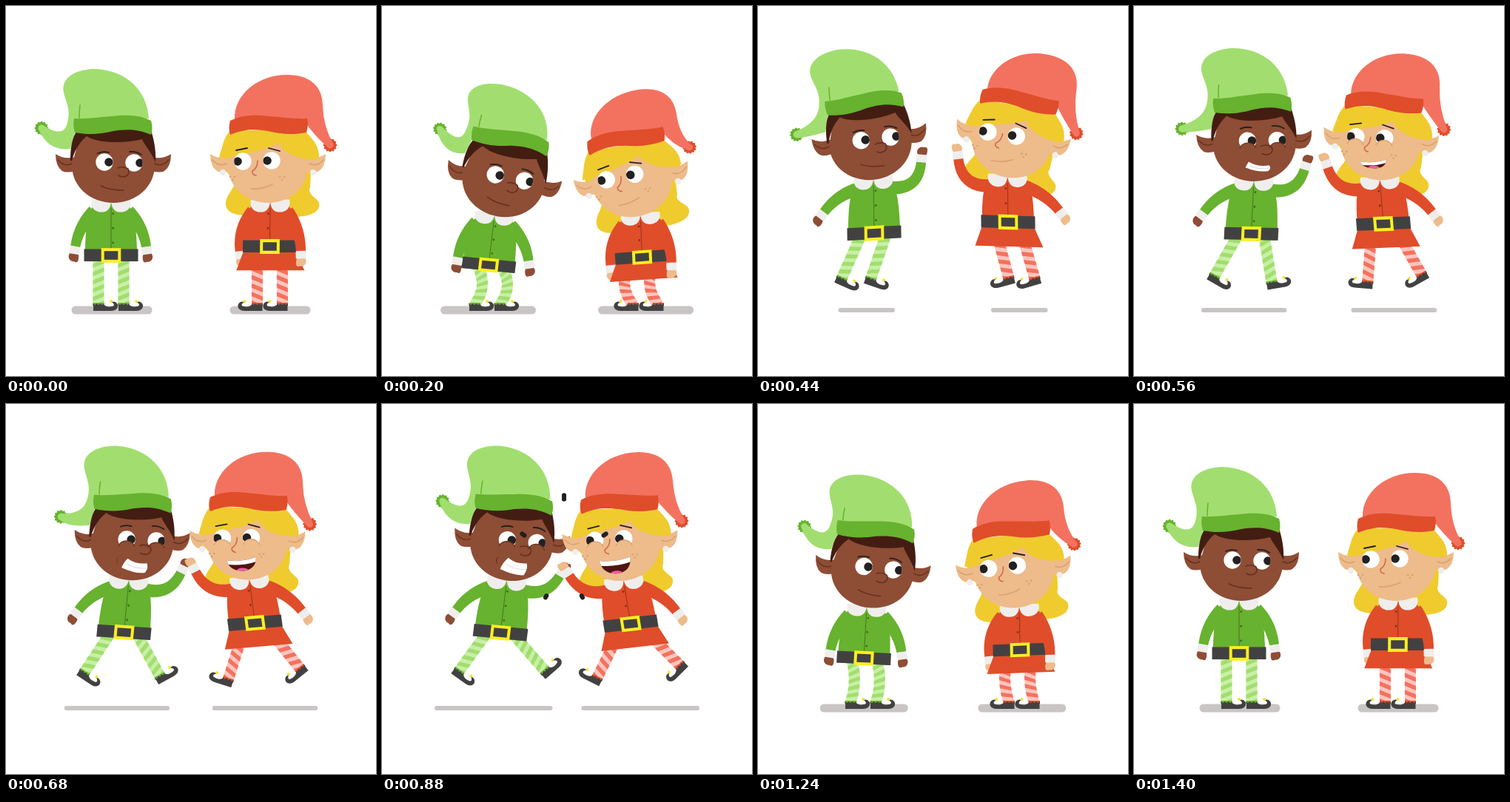
Write an HTML page that moves like this. It is 500x500 px and loops after 1480 ms.

```html
<!DOCTYPE html>
<html lang="en">
<head>
<meta charset="utf-8">
<title>Elf high five</title>
<style>
html, body { margin: 0; width: 100%; height: 100%; overflow: hidden; background: #fff; }
svg { display: block; width: 100vw; height: 100vh; }
</style>
</head>
<body>
<svg id="stage" viewBox="0 0 500 500">
  <defs><clipPath id="eye"><circle r="11.7"/></clipPath></defs>
  <g id="scene"></g>
</svg>
<script>
const LOOP = 1480, STEP = 40, FLOOR = 404;
const DARK = '#424142', WHITE = '#efeeed', INK = '#222021', YELLOW = '#f0cb2e';

// Both elves face right; the girl is mirrored on stage.
// head and belt: rest place, then x, y, angle offsets for crouch, leap and clap.
const boy = {
  main: '#67b22e', light: '#a1de6f', pale: '#c9efa5', skin: '#8e4d35', line: '#66301f',
  hair: '#431d12', cheek: 56, torso: 69, hip: 0, hem: '', buttons: 3, arm: 54, hang: 27, lag: 0, turn: 6,
  head: [[145, 217, 0], [19, 19, 10.5], [7, -31, -8], [30, -27, 4]],
  belt: [[142, 337, 0], [2, 13, 5.5], [15, -30, -3], [18, -28, 5.5]],
  backLeg: [-24, -36], frontLeg: [-19, 41],
  eyes: [[-12, -6, 6], [28, -5, 8]],
  brows: 'M-21-18Q-14-21-6-19M22-20Q31-21 38-16', browLift: 5,
  nose: 'M6 2Q13-1 20 3Q23 10 17 13Q11 15 7 12', noseColor: '#66301f',
  fringe: 'M-58-8C-58-27-55-45-45-52L50-52C55-37 58-22 57-6C50-22 42-29 39-37C15-31-20-31-36-41C-48-31-53-19-56-8Z',
  dome: 'M48-65C46-102 18-131-26-132C-53-131-71-119-67-100C-64-87-57-77-62-59',
  tip: [-97, -52], droop: 26, tail: [-77, -29], tailBend: [10, -9], root: '-58-24L-52-45',
  crease: 'M-46-66Q-46-75-45-83', mouth: grin
};
const girl = {
  main: '#e04d2a', light: '#f3725f', pale: '#fbc5bd', skin: '#eebb8b', line: '#d79f6d',
  hair: YELLOW, cheek: 54, torso: 57, hip: 10, hem: 'L45 32L-47 32', buttons: 2, arm: 57, hang: 18, lag: 100, turn: 0,
  head: [[146, 217, 0], [16, 19, 9.5], [11, -34, -10], [32, -27, 2]],
  belt: [[143.5, 325, 0], [5, 14.5, 4], [18.5, -33, -1.5], [20.5, -28, 6.5]],
  backLeg: [-16, -45], frontLeg: [-15, 26],
  eyes: [[34, -7, 7], [-5, -8, 6]],
  brows: 'M43-22L28-25M-1-25L-16-21', browLift: 1,
  nose: 'M14-8Q14 2 21 6Q22 11 16 12', noseColor: '#cd6a50',
  fringe: 'M66-12C62-32 54-42 44-49L-46-49C-61-39-70-27-69-11C-46-7-21-17-14-32C-2-24 26-19 57-11Z',
  backHair: 'M52-48C66-30 66-5 55 8L45 20C44 30 58 38 57 52C55 64 40 66 28 66L-25 67C-50 70-72 64-69 49C-68 43-52 38-57 28L-58 8C-70 0-74-25-50-48Z',
  dome: 'M45-65C46-95 16-124-26-124C-56-124-74-109-74-82',
  tip: [-84, -29], droop: 3, tail: [-69, -48], tailBend: [-6, -6], root: '-50-60',
  crease: '', mouth: laugh
};

const EAR = 'M-78-17Q-66-9-52-13L-52 6Q-63 9-69 6Q-78 0-78-17Z';
const EAR_LINE = 'M-75-9Q-66 1-56-4';
const COLLAR = 'M-26-6C-29 7-19 11-13 11C-5 11 0 6 0-6Z';
const SHOE = 'M-7 0L-7 8L17 8C25 8 28 2 25-2C23-5 20-5 17-4C22-2 22 2 18 2C13 3 10 2 8 0Z';
const BAND = 'M-53-65C-35-64-20-67-2-68C20-71 38-69 51-62Q54-52 51-43C30-52 15-50 0-48C-20-43-35-43-52-46Q-55-56-53-65Z';

const n = v => Math.round(v * 100) / 100;
const mix = (a, b, k) => a + (b - a) * k;
const rad = deg => deg * Math.PI / 180;
const path = (d, fill, more = '') => `<path d="${d}" fill="${fill}" ${more}/>`;
const stroke = (d, color, w, more = '') =>
  `<path d="${d}" fill="none" stroke="${color}" stroke-width="${w}" stroke-linecap="round" ${more}/>`;
const dot = (x, y, r, fill) => `<circle cx="${n(x)}" cy="${n(y)}" r="${r}" fill="${fill}"/>`;
const rect = (x, y, w, h, fill, more = '') =>
  `<rect x="${n(x)}" y="${n(y)}" width="${n(w)}" height="${n(h)}" fill="${fill}" ${more}/>`;
const group = (tf, body) => `<g transform="${tf}">${body}</g>`;
const both = body => body + group('scale(-1 1)', body);

function ramp(t, from, to) {
  const u = Math.min(1, Math.max(0, (t - from) / (to - from)));
  return u * u * (3 - 2 * u);
}
// How much of each action is in the pose at time t
function actions(t, lag) {
  const u = Math.min(1, Math.max(0, (t - 440) / 440));
  const up = ramp(t, 200, 440);
  return {
    crouch: ramp(t, 0, 200) - up + ramp(t, 880, 1080) - ramp(t, 1080, 1400),
    air: up - ramp(t, 880, 1080),
    arms: up - ramp(t, 880, 1080 + lag),
    droop: up - ramp(t, 560, 880),
    reach: 1 - (1 - u) ** 2
  };
}
const pose = (w, rest, crouch, leap, clap) => rest + w.crouch * crouch + w.air * mix(leap, clap, w.reach);
const joint = (w, [rest, ...moves]) => rest.map((v, i) => pose(w, v, ...moves.map(m => m[i])));

// Limb outline: edge(t, side) walks along either side of a bent tube
function tube(a, b, c, w0, w1) {
  return (t, side) => {
    const q = k => (1 - t) ** 2 * a[k] + 2 * t * (1 - t) * b[k] + t * t * c[k];
    const d = k => (1 - t) * (b[k] - a[k]) + t * (c[k] - b[k]);
    const len = Math.hypot(d(0), d(1)) || 1, w = side * mix(w0, w1, t) / 2;
    return n(q(0) - d(1) / len * w) + ' ' + n(q(1) + d(0) / len * w);
  };
}
function ribbon(edge) {
  const one = [], two = [];
  for (let i = 0; i <= 12; i++) {
    one.push(edge(i / 12, 1));
    two.unshift(edge(i / 12, -1));
  }
  return 'M' + one.concat(two).join('L') + 'Z';
}

// Angle is measured from hanging straight down, outwards from the body
function arm(c, [x, y], side, angle, bend) {
  const sin = Math.sin(rad(angle)), cos = Math.cos(rad(angle));
  const wx = x + side * sin * c.arm, wy = y + cos * c.arm;
  const ex = (x + wx) / 2 + side * cos * bend, ey = (y + wy) / 2 - sin * bend;
  const turn = Math.atan2(wy - ey, wx - ex) * 180 / Math.PI;
  return path(ribbon(tube([x, y], [ex, ey], [wx, wy], 18, 13)), c.main)
    + group(`translate(${n(wx)} ${n(wy)}) rotate(${n(turn)})`,
      dot(13.5, 0, 6.8, c.skin)
      + `<ellipse cx="16" cy="${4 * side}" rx="4.5" ry="3" fill="${c.skin}"/>`
      + rect(-.5, -7, 10.5, 14, WHITE, 'rx="1.5"'));
}

// The foot stays planted on the floor until the leg swings freely in the air
function leg(c, w, hip, side, swing) {
  const angle = mix(...swing, w.reach), [restX, restY] = c.belt[0];
  const len = FLOOR - restY - c.hip;
  const x = mix(restX + side * 17, hip[0] + Math.sin(rad(angle)) * len, w.air);
  const y = mix(FLOOR, hip[1] + Math.cos(rad(angle)) * len, w.air);
  const edge = tube(hip, [(hip[0] + x) / 2 + 19 * w.crouch, (hip[1] + y) / 2], [x, y], 15, 15);
  const at = (t, s) => edge(Math.min(1, Math.max(0, t)), s);
  let stripes = '';
  for (let t = 0; t < 1.2; t += 1 / 6)
    stripes += `M${at(t, 1)}L${at(t + .085, 1)}L${at(t - .005, -1)}L${at(t - .09, -1)}Z`;
  const shoe = rect(-7.5, -3, 15, 3.5, c.main)
    + path('M-7.5 1V-2' + 'l2.5 2l2.5-2'.repeat(3) + 'V1Z', DARK)
    + path(SHOE, DARK) + dot(17, -5, 1.9, '#f6e42a');
  return path(ribbon(edge), c.pale) + path(stripes, c.light)
    + group(`translate(${n(x)} ${n(y)}) rotate(${n(-angle * w.air)})`, shoe);
}

function torso(c) {
  const top = -c.torso;
  let buttons = '';
  for (let i = 0; i < c.buttons; i++) buttons += dot(2.7, top + 13 + 19.5 * i, 1.4, '#00000066');
  return path(`M20 ${top - 1}C31 ${top + 6} 34-42 35-9L36 8${c.hem}L-36 8L-35-9C-34-42-31 ${top + 6}-20 ${top - 1}Z`, c.main)
    + stroke(`M0 ${top + 6}V-9`, '#00000055', 1) + buttons
    + rect(-36.5, -8.5, 73, 16.5, DARK)
    + rect(-11.3, -7.8, 22.6, 15.6, DARK, 'stroke="#fcee21" stroke-width="4"');
}

function pompom(x, y, color) {
  let d = '';
  for (let i = 0; i < 48; i++) {
    const a = i * Math.PI / 24, r = 8.7 + .9 * Math.cos(a * 12);
    d += (i ? 'L' : 'M') + n(x + r * Math.cos(a)) + ' ' + n(y + r * Math.sin(a));
  }
  return path(d + 'Z', color);
}

function hat(c, w) {
  const [px, y] = c.tip, py = y + c.droop * w.droop;
  const mx = c.tail[0] + 2 * w.crouch, my = c.tail[1] + 5 * w.crouch, [bx, by] = c.tailBend;
  const len = Math.hypot(px - mx, py - my), half = 4.6;
  const nx = -(py - my) / len * half, ny = (px - mx) / len * half;
  const d = `${c.dome}Q${n(mx + bx)} ${n(my + by)} ${n(px + nx)} ${n(py + ny)}`
    + `A${half} ${half} 0 0 0 ${n(px - nx)} ${n(py - ny)}`
    + `Q${n(mx - bx)} ${n(my - by)} ${c.root}Z`;
  const squash = .075 * w.crouch;
  return group(`translate(0 ${n(-62 * squash)}) scale(1 ${n(1 - squash)})`,
    pompom(px, py, c.main) + path(d, c.light) + stroke(c.crease, c.main, 1.5));
}

function eye(c, [x, y, look], lid) {
  const cy = 26 - 12 * lid;
  return group(`translate(${x} ${y})`,
    dot(0, 0, 11.7, '#fff')
    + `<g clip-path="url(#eye)">${dot(look, 0, 5.8, INK)}</g>`
    + (lid > 0 ? dot(0, cy, 12, c.skin)
      + stroke(`M-11 ${n(cy - 4.8)}A12 12 0 0 1 11 ${n(cy - 4.8)}`, c.line, 1.2, `stroke-opacity="${n(lid)}"`) : ''));
}

// Toothy band that thickens as k goes from 0 to 1
function grin(k) {
  if (k < .04) return stroke('M-17 26Q-5 32 14 32', boy.line, 1.5);
  const rise = 8 * k;
  const row = (shift, lean) =>
    [-14 + lean * 5 * k, 26 + shift, 1, 34 + shift, 15 + lean * 1.5 * k, 32 + shift].map(n);
  const [ax, ay, ...top] = row(-rise, 1), [bx, by, qx, qy, ex, ey] = row(rise, -1);
  const mid = row(0, 0);
  return path(`M${ax} ${ay}Q${top.join(' ')}Q${ex + 5} ${n(ey - rise)} ${ex} ${ey}Q${qx} ${qy} ${bx} ${by}Q${bx + 2} ${n(by - rise)} ${ax} ${ay}Z`, '#fff')
    + stroke(`M${mid[0] + 3} ${mid[1] + 1}Q${mid.slice(2).join(' ')}`, '#deddde', 1)
    + stroke('M-23 18Q-26 22-24 27', boy.line, 1.2, `stroke-opacity="${n(Math.max(0, 2 * k - 1))}"`);
}

// Smile whose lower lip drops as k goes from 0 to 1
function laugh(k) {
  const ax = n(23 + 6 * k), ay = n(30 - 9 * k), bx = n(-6 - 7 * k), by = n(24 - 7 * k);
  const top = `M${ax} ${ay}Q8 ${n(31 - 7 * k)} ${bx} ${by}`;
  if (k < .04) return stroke(top, '#dca06c', 1.5);
  const low = n(29 + 10 * k), d = `${top}Q${bx - 1} ${low - 3} 4 ${low}Q${ax - 4} ${low + 1} ${ax} ${ay}Z`;
  return `<clipPath id="lips"><path d="${d}"/></clipPath>` + path(d, '#4f1511')
    + `<g clip-path="url(#lips)"><ellipse cx="6" cy="${low + 1}" rx="9" ry="5" fill="#ee5fa8"/>`
    + stroke(top, '#fff', n(4 + 9 * k)) + '</g>';
}

function freckles() {
  return [48, -19].map(x => dot(x - 3, 14, 1.3, '#dda06c') + dot(x + 3, 14, 1.3, '#dda06c')
    + dot(x, 18, 1.3, '#dda06c')).join('');
}

function head(c, w) {
  const open = w.air * w.reach, lid = Math.min(1, 2 * open), r = c.cheek;
  const ear = path(EAR, c.skin) + stroke(EAR_LINE, c.line, 1.4) + (c === girl ? dot(-61, 8, 4.2, WHITE) : '');
  const face = c.eyes.map(e => eye(c, e, lid)).join('')
    + group(`translate(0 ${n(-lid * c.browLift)})`, stroke(c.brows, INK, 1.8))
    + stroke(c.nose, c.noseColor, 1.6) + (c === girl ? freckles() : '') + c.mouth(open);
  return hat(c, w) + group(`translate(0 ${n(3 * w.crouch)})`, both(ear))
    + path(`M${-r}-2C${-r} 28-30 49 0 49C30 49 ${r} 28 ${r}-2L48-46L-44-46Z`, c.skin)
    + path(c.fringe, c.hair)
    + group(`translate(${n(c.turn * open)} 0)`, face)
    + path(BAND, c.main);
}

function elf(c, t) {
  const w = actions(t, c.lag);
  const [hx, hy, nod] = joint(w, c.head), [bx, by, tilt] = joint(w, c.belt);
  const sinN = Math.sin(rad(nod)), cosN = Math.cos(rad(nod));
  const nx = hx - 3 * cosN - 50.5 * sinN, ny = hy - 3 * sinN + 50.5 * cosN;
  const cos = Math.cos(rad(tilt)), sin = Math.sin(rad(tilt));
  const sx = (bx - nx) / c.torso, sy = (by - ny) / c.torso;
  const spot = (x, y) => [bx + x * cos + y * sx, by + x * sin + y * sy];
  const skull = `translate(${n(hx)} ${n(hy)}) rotate(${n(nod)})`;
  const trunk = `matrix(${[cos, sin, sx, sy, bx, by].map(v => v.toFixed(4)).join(' ')})`;
  const left = pose(w, 88.5, -9.5, 20, -17.5), right = pose(w, 197.5, 10.5, -12.5, 33), thick = 11 - 5 * w.air;
  const raise = mix(c.hang, mix(130, 112, w.reach), w.arms);
  const shoulder = 10 - c.torso;
  return rect(left, 411 - thick / 2, right - left, thick, '#c9c5c4', `rx="${n(thick / 2)}"`)
    + (c.backHair ? group(skull, path(c.backHair, c.hair)) : '')
    + leg(c, w, spot(-17, c.hip), -1, c.backLeg)
    + leg(c, w, spot(17, c.hip), 1, c.frontLeg)
    + arm(c, spot(23, shoulder), 1, raise, 11 - .35 * (raise - 22))
    + group(trunk, torso(c))
    + arm(c, spot(-23, shoulder), -1, mix(c.hang + 1, 55, w.arms), 9)
    + group(trunk, group(`translate(0 ${-c.torso})`, both(path(COLLAR, WHITE))))
    + group(skull, head(c, w));
}

// Short strokes fly outwards from the clap, alike on both sides
function sparks(t) {
  const p = (t - 720) / 200;
  if (p <= 0 || p >= 1) return '';
  return [[0, 100], [53, 75], [150, 53]].map(([angle, far]) => [-1, 1].map(side => {
    const end = k => n(246 + side * Math.sin(rad(angle)) * far * k) + ' ' + n(218 - Math.cos(rad(angle)) * far * k);
    return stroke(`M${end(p ** .5)}L${end(p ** .25)}`, INK, 6);
  }).join('')).join('');
}

const scene = document.getElementById('scene');
let shown = -1;
function draw(now) {
  const t = Math.min(1400, Math.floor(now % LOOP / STEP) * STEP);
  if (t === shown) return;
  shown = t;
  scene.innerHTML = elf(boy, t) + group('translate(500 0) scale(-1 1)', elf(girl, t)) + sparks(t);
}
const start = performance.now();
function tick() {
  draw(performance.now() - start);
  requestAnimationFrame(tick);
}
tick();
</script>
</body>
</html>
```
